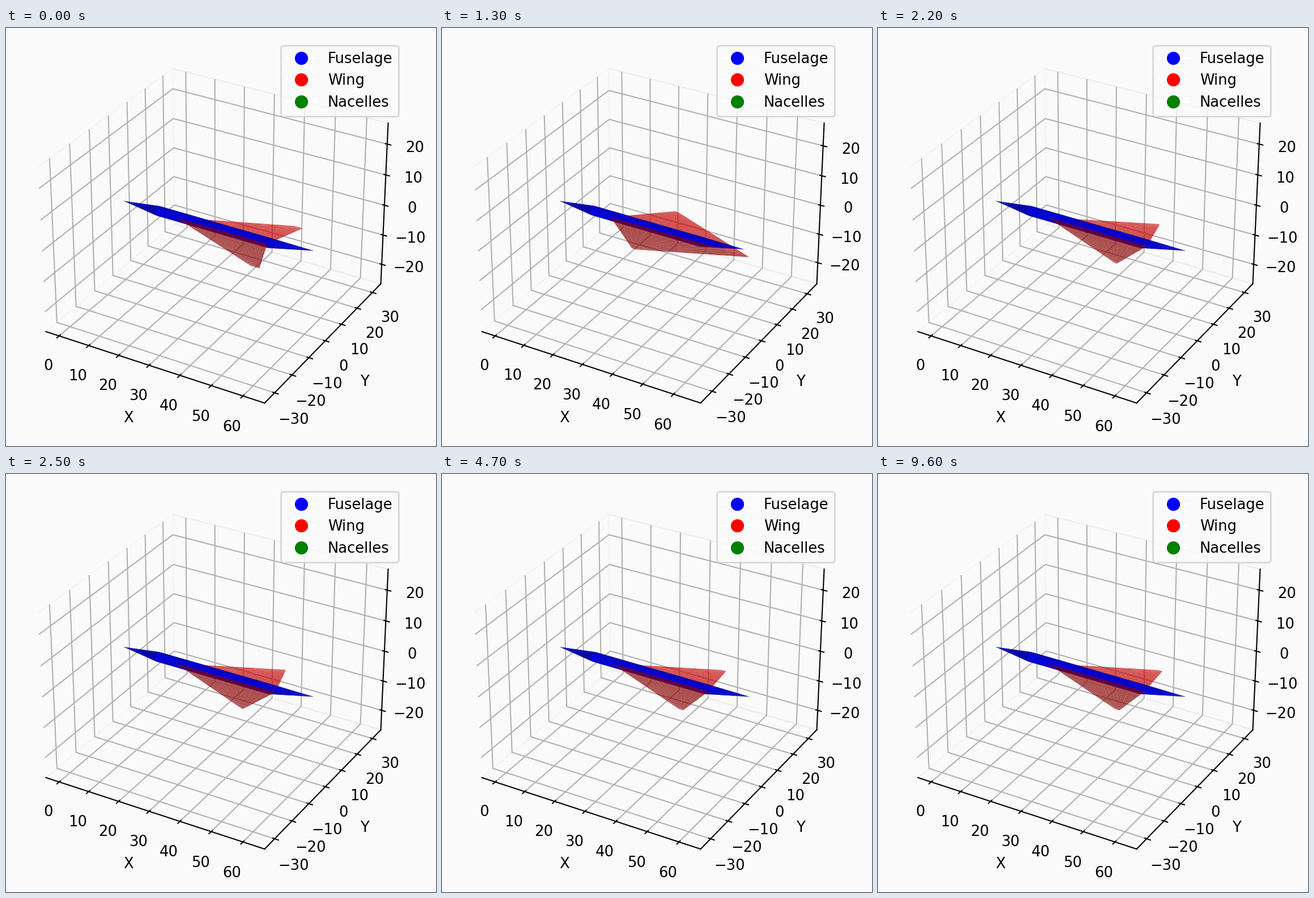
Recreate the animation shown at these times as a matplotlib script. Size 759 px wide and 738 px high, loop 10000 ms.

```python
import matplotlib.pyplot as plt
import numpy as np
from matplotlib.animation import FuncAnimation
from matplotlib.lines import Line2D

W, H, DPI = 759, 738, 185.9
SIDE, LEFT, TOP = 687.2, 18.6, 18.3
FRAMES, INTERVAL = 100, 100
BACK = "#fafafa"
LENGTH, RADIUS = 62.2, 1.45
WING_Z = -0.5

# Wing designs: root x, sweep offset of the tip, half span, root chord, tip chord
START = np.array([17.7, 31.6, 12.7, 29.9, 2.8])
WILD = np.array([17.7, -107.3, 12.7, 170.7, 0])
FINAL = np.array([17.7, 29.1, 12.5, 31.6, 1.4])
TRIAL_END, PEAK, SETTLE, DONE = 12, 16, 22, 66


def bell(n, centre, width):
    return np.exp(-((n - centre) / width) ** 2)


def design_at(n):
    """Trial steps, one wild swing, then a damped search for the optimum."""
    if n < TRIAL_END:
        resting = n == 0 or n % 7 in (3, 4)
        return START if resting else START + np.eye(5)[(n - 7) % 5]
    n = min(n, DONE)
    detour = bell(n, 28, 8)
    design = FINAL + detour * np.array([0, -0.2, 0, 1.3, -1.2])
    if n < SETTLE:
        return design + bell(n, PEAK, 2) * (WILD - design)
    t = n - SETTLE
    design[[1, 3]] += 0.8 * np.exp(-t / 10) * np.sin(3 * np.pi * t / 8)
    return design


def surface(x, y, z, color, alpha, zorder):
    return ax.plot_surface(x, y, z, color=color, alpha=alpha,
                           linewidth=0.1, zorder=zorder)


def draw_fuselage():
    theta = np.linspace(0, 2 * np.pi, 25)
    x = np.array([0, 11.7, 48.3, LENGTH])[:, None]
    r = np.array([0, RADIUS, RADIUS, 0])[:, None]
    z = np.array([0, 0, 0, 1.6])[:, None]
    surface(x + 0 * theta, r * np.cos(theta), z + r * np.sin(theta),
            "blue", 0.9, 2)


def draw_wing(design, side):
    root, offset, span, chord, tip_chord = design
    c, s = np.meshgrid(np.linspace(0, 1, 15), np.linspace(0, 1, 15))
    x = root + offset * s + (chord + (tip_chord - chord) * s) * c
    return surface(x, side * span * s, np.full_like(x, WING_Z),
                   "red", 0.7, 2 - side)


def fit_view(design):
    root, offset, span, chord, tip_chord = design
    low = min(0, root, root + offset)
    high = max(LENGTH, root + chord, root + offset + tip_chord)
    mid = (low + high) / 2
    half = max(high - low, 2 * span) / 2 * 1.1 * 25 / 24
    ax.set_xlim(mid - half, mid + half)
    ax.set_ylim(-half, half)
    ax.set_zlim(-0.75 * half, 0.75 * half)


def update(n):
    while wings:
        wings.pop().remove()
    design = design_at(n)
    wings.extend(draw_wing(design, side) for side in (1, -1))
    fit_view(design)
    return wings


fig = plt.figure(figsize=((W + 1e-6) / DPI, (H + 1e-6) / DPI), dpi=DPI,
                 facecolor=BACK)
ax = fig.add_axes([LEFT / W, 1 - (TOP + SIDE) / H, SIDE / W, SIDE / H],
                  projection="3d", computed_zorder=False, facecolor="none")
for axis in (ax.xaxis, ax.yaxis, ax.zaxis):
    axis.pane.set_fill(False)
ax.set_xlabel("X")
ax.set_ylabel("Y")

parts = [("Fuselage", "blue"), ("Wing", "red"), ("Nacelles", "green")]
handles = [Line2D([0], [0], marker="o", color="w", markerfacecolor=color,
                  markersize=10, label=name) for name, color in parts]
ax.legend(handles=handles, loc="upper right", facecolor=BACK)

wings = []
draw_fuselage()
anim = FuncAnimation(fig, update, frames=FRAMES, interval=INTERVAL,
                     repeat=True, repeat_delay=0, blit=False)
plt.show()
```
